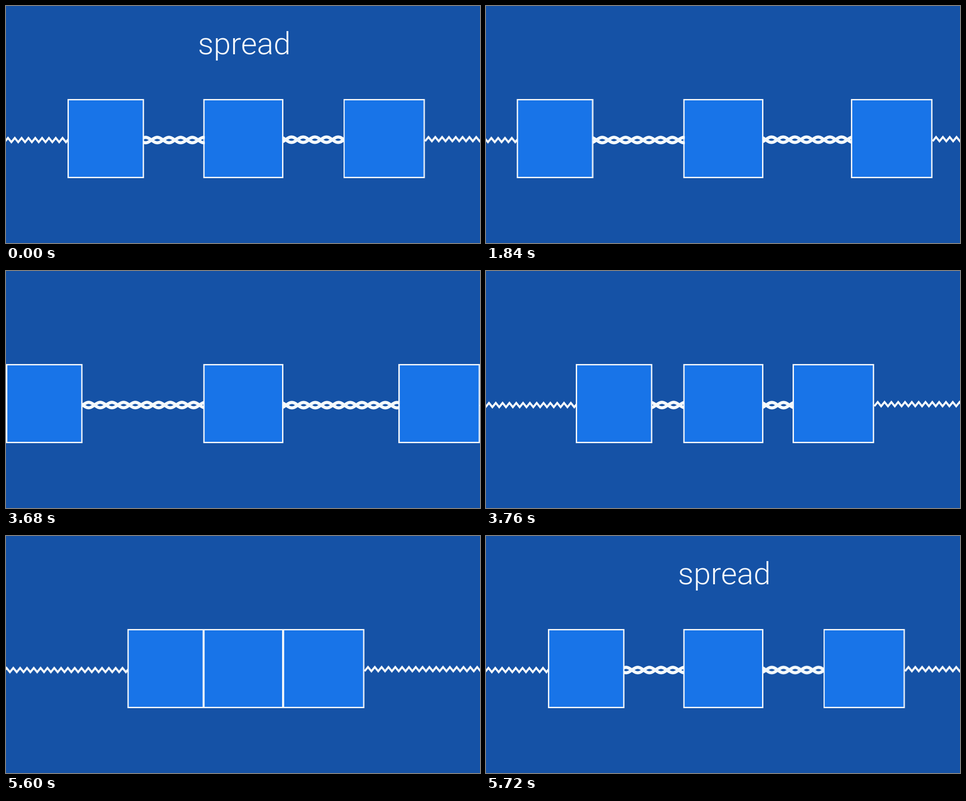
An HTML page that plays this animation: 1056x530 px, repeating every 5760 ms.

```html
<!DOCTYPE html>
<html lang="en">
<head>
<meta charset="utf-8">
<title>Chain styles</title>
<style>
html, body { margin: 0; width: 100%; height: 100%; overflow: hidden; background: #1552a6; }
svg { display: block; width: 1056px; height: 530px; }
text { font: 300 69px Roboto, sans-serif; fill: #f3f7fb; text-anchor: middle; }
.box { fill: #1874e8; stroke: #f2f6fa; stroke-width: 3; }
.cover { fill: #1552a6; }
.zigzag { fill: none; stroke: #f3f7fa; stroke-width: 4.5; stroke-miterlimit: 10; }
.chain { fill: none; stroke: #f4f9fb; stroke-width: 7; }
.tip { stroke: #f4f9fb; }

.anim { animation: 5760ms step-end infinite; }
#left { animation-name: left; }
#right { animation-name: right; }
#chainL { animation-name: slipL; }
#chainR { animation-name: slipR; }
#spread { animation-name: first; }
#inside { animation-name: second; }
#packed { animation-name: third; }
.tip { animation-name: tip; }

/* Moves are eased and sampled every 40 ms. */
@keyframes left {
  0% { transform: translateX(137px); }
  31.249% { transform: translateX(115px); }
  31.944% { transform: translateX(68.5px); }
  32.638% { transform: translateX(22px); }
  33.333% { transform: translateX(0); }
  64.583% { transform: translateX(70px); }
  65.277% { transform: translateX(200px); }
  65.972% { transform: translateX(270.5px); }
  97.916% { transform: translateX(236px); }
  98.611% { transform: translateX(172px); }
  99.305% { transform: translateX(138px); }
}
@keyframes right {
  0% { transform: translateX(751.5px); }
  31.249% { transform: translateX(771px); }
  31.944% { transform: translateX(813px); }
  32.638% { transform: translateX(855px); }
  33.333% { transform: translateX(874.3px); }
  64.583% { transform: translateX(807px); }
  65.277% { transform: translateX(683px); }
  65.972% { transform: translateX(616.7px); }
  97.916% { transform: translateX(652px); }
  98.611% { transform: translateX(716px); }
  99.305% { transform: translateX(751.5px); }
}
@keyframes slipL {
  0% { transform: none; }
  63.888% { transform: translateX(3px); }
  99.305% { transform: translateX(1px); }
}
@keyframes slipR {
  0% { transform: none; }
  33.333% { transform: translate(1px, 1px); }
  99.305% { transform: translate(.7px, .7px); }
}
@keyframes first {
  0%, 99.305% { visibility: visible; }
  30.555% { visibility: hidden; }
}
@keyframes second {
  0%, 63.888% { visibility: hidden; }
  33.333% { visibility: visible; }
}
@keyframes third {
  0%, 97.222% { visibility: hidden; }
  65.972% { visibility: visible; }
}
@keyframes tip {
  0% { visibility: visible; }
  63.888% { visibility: hidden; }
}
</style>
</head>
<body>
<svg viewBox="0 0 1056 530">
  <path id="chainL" class="chain anim"/>
  <path id="chainR" class="chain anim"/>
  <rect class="box" x="441" y="209.5" width="175.5" height="174"/>
  <path class="tip anim" d="M442.5 291v6M442.5 303v6"/>
  <g id="left" class="anim">
    <rect class="cover" x="-500" y="280" width="501" height="40"/>
    <path id="zigL" class="zigzag"/>
    <rect class="box" x="1.5" y="209.5" width="167.5" height="174"/>
  </g>
  <g id="right" class="anim">
    <rect class="cover" x="181" y="280" width="600" height="40"/>
    <path id="zigR" class="zigzag"/>
    <rect class="box" x="1.5" y="209.5" width="178.7" height="174"/>
  </g>
  <text id="spread" class="anim" x="531" y="108">spread</text>
  <text id="inside" class="anim" x="531" y="108.7">spread_inside</text>
  <text id="packed" class="anim" x="531" y="109">packed</text>
</svg>
<script>
const setPath = (id, d) => document.getElementById(id).setAttribute('d', d);

// Two mirrored cosine strands; "mid" is the centre of one link.
function strands(from, to, mid, y) {
  const strand = amp => {
    const points = [];
    for (let x = from; x <= to; x++) {
      points.push(x + ' ' + (y + amp * Math.cos(Math.PI * (x - mid) / 26)).toFixed(2));
    }
    return 'M' + points.join('L');
  };
  return strand(6) + strand(-6);
}

function zigzag(peak, step, count, top) {
  const points = [];
  for (let i = -1; i < count; i++) {
    points.push((peak + i * step).toFixed(2) + ' ' + (i % 2 ? top + 9.4 : top));
  }
  return 'M' + points.join('L');
}

setPath('chainL', strands(150, 441, 337, 299.8));
setPath('chainR', strands(612, 885, 636, 299));
setPath('zigL', zigzag(-11 + 15.2, -7.6, 50, 295));
setPath('zigR', zigzag(181.7 + 8, 7.6, 50, 293));
</script>
</body>
</html>
```
